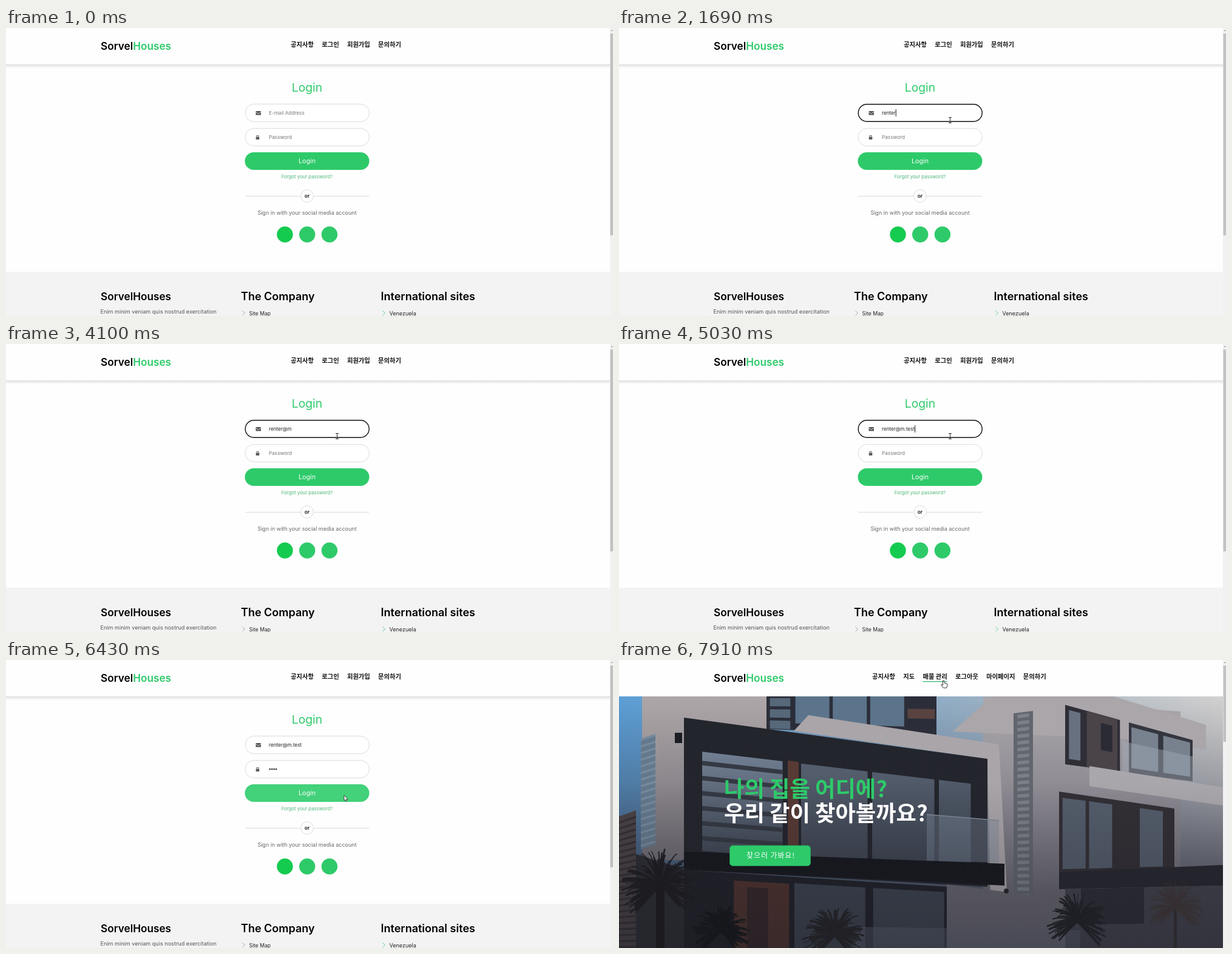
Animation of 1000 by 475 pixels, one loop 7990 ms. Source, as an HTML page with a canvas:

```html
<!DOCTYPE html>
<html lang="ko">
<head>
<meta charset="utf-8">
<title>Login</title>
<style>
html, body { margin: 0; width: 100%; height: 100%; overflow: hidden; background: #fefefe; }
canvas { display: block; width: 1000px; height: 475px; }
</style>
</head>
<body>
<canvas id="stage" width="1000" height="475"></canvas>
<script>
const W = 1000, H = 475, LOOP = 7990;
const FOCUS = 700, TAB = 5120, CLICK = 6360, SWAP = 6510;
const STEP = 75, BLINK = 530;
const GREEN = '#2eca6a';
const LATIN = 'Inter, "Open Sans", sans-serif';
const HANGUL = '"Noto Sans CJK KR", "Noto Sans CJK JP", "Noto Sans CJK", sans-serif';
const BRAND = ['Sorvel', 'Houses'];
const EMAIL = 'renter@m.test';

// times of the key strokes
const EMAIL_KEYS = [1010, 1070, 1380, 1540, 1540, 1690, 2700, 3570, 4250, 4410, 4650, 4820, 5030];
const PASS_KEYS = [5420, 5590, 5650, 5810];

// pointer moves: start, end, from, to
const MOVES = [
  [70, 770, [967, 476], [545, 152]],
  [5980, 6430, [545, 152], [557, 223]],
  [SWAP, SWAP, [557, 223], [555, 222]],
  [6970, 7510, [555, 222], [478, 33]],
  [7670, 7910, [478, 33], [534, 33]]
];

const NAV_GUEST = ['공지사항', '로그인', '회원가입', '문의하기'];
const NAV_USER = ['공지사항', '지도', '매물 관리', '로그아웃', '마이페이지', '문의하기'];

const stage = document.getElementById('stage').getContext('2d');
let c = stage;

function text(str, x, y, size, color, opt = {}) {
  c.font = `${opt.weight || 400} ${size}px ${opt.family || LATIN}`;
  c.textAlign = opt.align || 'left';
  c.letterSpacing = (opt.spacing || 0) + 'px';
  c.fillStyle = color;
  c.fillText(str, x, y);
  const w = c.measureText(str).width;
  c.letterSpacing = '0px';
  return w;
}

function rect(x, y, w, h, color) {
  c.fillStyle = color;
  c.fillRect(x, y, w, h);
}

function pill(x, y, w, h, r, fill, stroke, width = 1) {
  c.beginPath();
  c.roundRect(x, y, w, h, r);
  c.fillStyle = fill;
  c.fill();
  if (stroke) { c.strokeStyle = stroke; c.lineWidth = width; c.stroke(); }
}

function disc(x, y, r, fill, stroke) {
  c.beginPath();
  c.arc(x, y, r, 0, Math.PI * 2);
  c.fillStyle = fill;
  c.fill();
  if (stroke) { c.strokeStyle = stroke; c.lineWidth = 1; c.stroke(); }
}

function trace(pts) {
  c.beginPath();
  for (let i = 0; i < pts.length; i += 2) c.lineTo(pts[i], pts[i + 1]);
}

function poly(color, ...pts) {
  trace(pts);
  c.closePath();
  c.fillStyle = color;
  c.fill();
}

function line(color, width, ...pts) {
  trace(pts);
  c.strokeStyle = color;
  c.lineWidth = width;
  c.stroke();
}

function fade(x0, y0, x1, y1, ...stops) {
  const g = c.createLinearGradient(x0, y0, x1, y1);
  stops.forEach((s, i) => g.addColorStop(i / (stops.length - 1), s));
  return g;
}

const down = (y0, y1, ...stops) => fade(0, y0, 0, y1, ...stops);

// A wall with upright sides in perspective; panels are given in fractions of it.
function wall(x0, x1, topL, topR, botL, botR) {
  const at = (u, v) => {
    const top = topL + (topR - topL) * u, bot = botL + (botR - botL) * u;
    return [x0 + (x1 - x0) * u, top + (bot - top) * v];
  };
  return (color, u0 = 0, u1 = 1, v0 = 0, v1 = 1) =>
    poly(color, ...at(u0, v0), ...at(u1, v0), ...at(u1, v1), ...at(u0, v1));
}

function plant(x, y, r, color, seed) {
  const rnd = () => (seed = (seed * 16807) % 2147483647) / 2147483647;
  for (let i = 0; i < 130; i++) {
    const a = -Math.PI * (rnd() * 1.5 - 0.25), d = r * (0.5 + 0.5 * rnd());
    c.beginPath();
    c.moveTo(x, y);
    c.quadraticCurveTo(x + Math.cos(a) * d * 0.6, y + Math.sin(a) * d * 0.75 - 4,
      x + Math.cos(a) * d, y + Math.sin(a) * d + 4);
    c.strokeStyle = color;
    c.lineWidth = 1 + rnd() * 2;
    c.stroke();
  }
}

function drawSky() {
  rect(0, 60, W, 415, fade(0, 0, W, 0, '#5c9fd6', '#7ba6cb', '#a3b5c3', '#d4d2d1'));
  rect(0, 60, W, 415, down(60, 420, 'rgba(50,58,80,0)', 'rgba(60,62,78,.9)'));
}

function drawRightHouse() {
  const body = wall(600, 925, 60, 85, 420, 420);
  body(down(60, 400, '#aca9ad', '#8a8790', '#66646e'));
  poly('#aaa6aa', 550, 118, 614, 60, 815, 60, 967, 107, 967, 148, 830, 130);

  const upper = wall(735, 945, 74, 132, 172, 200);
  upper('#2f2e37', 0, 0.43);
  upper('#677180', 0.03, 0.12, 0.07, 0.9);
  upper('#4a4347', 0.17, 0.41);
  upper('#2a2b34', 0.28, 0.37, 0.15, 0.65);
  upper('#34363f', 0.5, 1);
  for (const u of [0.52, 0.77]) upper('#78828f', u, u + 0.21, 0.08, 0.9);
  upper('rgba(160,168,180,.45)', 0.45, 1, 0.4, 1);
  wall(775, 995, 175, 210, 208, 240)('#aaa7ac');

  const lower = wall(725, 915, 217, 245, 352, 345);
  lower('#322f35');
  for (const u of [0.03, 0.26, 0.7]) lower('#545d6b', u, u + 0.2, 0.07, 0.95);
  wall(725, 995, 350, 338, 378, 372)('#27272f');

  const base = wall(735, 995, 378, 372, 475, 475);
  base('#42434d');
  base('#2c2d36', 0.1, 0.5, 0, 0.6);

  const blocks = wall(650, 682, 88, 84, 400, 400);
  blocks('#62666f');
  for (let v = 0.01; v < 1; v += 0.035) blocks('#7c8088', 0.2, 0.8, v, v + 0.018);
}

function drawLeftHouse() {
  wall(38, 243, 60, 60, 330, 330)(down(60, 330, '#aea7a9', '#6d6a72'));
  const blocks = wall(36, 60, 130, 122, 312, 305);
  blocks('#64798d');
  for (let v = 0; v < 1; v += 0.06) blocks('#768a9c', 0, 1, v, v + 0.02);

  const upper = wall(243, 523, 60, 60, 114, 124);
  upper('#2b2e39');
  for (let v = 0.05; v < 0.9; v += 0.34) upper('#56687a', 0.02, 0.14, v, v + 0.25);
  for (let u = 0.17; u < 0.8; u += 0.22) upper('#5c748b', u, u + 0.2, 0, 0.8);
  upper('#594340', 0.83, 0.99, 0.33, 0.58);
  poly('#aaa5a9', 288, 117, 312, 91, 626, 139, 640, 400, 612, 400, 607, 163);

  const front = wall(107, 607, 95, 163, 346, 374);
  front(down(95, 350, '#23252c', '#24252d'));
  front(down(150, 320, '#728094', '#3f4653'), 0.06, 0.325, 0.21, 0.87);
  for (let v = 0.27; v < 0.85; v += 0.1) front('#343943', 0.06, 0.325, v, v + 0.03);
  front('#573a34', 0.342, 0.378, 0.2, 0.87);
  for (const [u0, u1] of [[0.386, 0.605], [0.62, 0.825], [0.84, 0.945]])
    front(down(185, 335, '#535d6c', '#3d4350'), u0, u1, 0.21, 0.86);

  const rail = wall(507, 626, 254, 264, 331, 334);
  rail('rgba(125,139,155,.45)');
  rail('#808b98', 0, 1, 0, 0.02);

  const ground = wall(107, 540, 346, 374, 475, 475);
  ground('#202128');
  ground('#4f332e', 0.19, 0.4, 0.1);
  ground('#35272a', 0.24, 0.32, 0.18);
  for (const u of [0.42, 0.72]) ground('#3d4450', u, u + 0.27, 0.09);
  wall(540, 735, 370, 395, 475, 475)('#696871');
  wall(107, 635, 316, 336, 346, 372)('#17181e');
  wall(390, 760, 440, 446, 475, 475)('rgba(95,103,117,.45)');
  disc(638, 381, 4, '#25262e');
  rect(92, 120, 12, 17, '#1b1d25');
}

function drawGarden() {
  const annex = wall(0, 28, 258, 248, 475, 475);
  annex('#4a4245');
  for (let v = 0.04; v < 1; v += 0.045) annex('#343037', 0, 1, v, v + 0.015);
  wall(28, 107, 320, 345, 475, 475)('#2d2d34');
  rect(0, 60, W, 415, down(200, H, 'rgba(25,26,34,0)', 'rgba(25,26,34,.38)'));
  rect(61, 372, 14, 103, '#1c1a1e');
  plant(68, 372, 65, '#1d1c21', 11);
  plant(168, 448, 48, '#17181d', 23);
  plant(355, 455, 54, '#212126', 37);
  plant(755, 432, 52, '#1f2026', 53);
  rect(914, 412, 5, 63, '#2b282d');
  plant(917, 408, 50, '#37303380', 71);
}

const photo = document.createElement('canvas');
photo.width = W;
photo.height = H;
c = photo.getContext('2d');
drawSky();
drawRightHouse();
drawLeftHouse();
drawGarden();
c = stage;

// returns the place of each label
function drawHeader(nav, left) {
  rect(0, 0, 995, 60, '#fefefe');
  const w = text(BRAND[0], 156, 36, 17.2, '#000', { weight: 600 });
  text(BRAND[1], 156 + w, 36, 17.2, GREEN, { weight: 600 });
  let x = left;
  return nav.map(label => {
    const place = { x, w: text(label, x, 30.5, 10.3, '#111', { weight: 700, family: HANGUL }) };
    x += place.w + 13.3;
    return place;
  });
}

function drawScrollbar(bottom) {
  rect(995, 0, 5, H, '#f1f1f1');
  rect(995.5, 9, 4.5, bottom - 9, '#c1c1c1');
  poly('#8a8a8a', 996.5, 5, 998, 3, 999.5, 5);
}

function drawField(y, focused) {
  if (focused) pill(394.2, y + 0.7, 204, 28.6, 14.3, '#fff', '#111', 1.4);
  else pill(394, y + 0.5, 204.5, 29, 14.5, '#fff', '#dcdcdc');
}

const typed = (keys, t) => keys.filter(k => k <= t).length;

// the caret stays lit after each stroke, then blinks
function drawCaret(x, y, t, keys, focusTime) {
  const last = Math.max(focusTime, ...keys.filter(k => k <= t));
  if ((t - last) % (2 * BLINK) < BLINK) rect(x, y - 6, 1, 12, '#222');
}

function drawEmail(t) {
  const focused = t >= FOCUS && t < TAB, n = typed(EMAIL_KEYS, t);
  drawField(125, focused);
  rect(411.5, 137, 8.5, 6.5, '#555');
  line('#fff', 0.8, 411.5, 138.5, 415.7, 141.3, 420, 138.5);
  let w = 0;
  if (n) w = text(EMAIL.slice(0, n), 433, 143, 8.1, '#222');
  else text('E-mail Address', 433, 143, 8.2, '#777');
  if (focused) drawCaret(433 + w, 140, t, EMAIL_KEYS, FOCUS);
}

function drawPassword(t) {
  const focused = t >= TAB && t < CLICK, n = typed(PASS_KEYS, t);
  drawField(165, focused);
  rect(411.7, 179.5, 5.6, 4.3, '#555');
  c.beginPath();
  c.arc(414.5, 179, 1.8, Math.PI, 0);
  c.strokeStyle = '#555';
  c.lineWidth = 1.1;
  c.stroke();
  if (!n) text('Password', 433, 183, 8.2, '#777');
  for (let i = 0; i < n; i++) disc(434.8 + i * 3.4, 180, 1.3, '#222');
  if (focused) drawCaret(433 + n * 3.4, 180, t, PASS_KEYS, TAB);
}

function drawForm(t, pos) {
  const mid = { align: 'center' };
  text('Login', 496, 104.5, 19.3, GREEN, mid);
  drawEmail(t);
  drawPassword(t);

  const hover = pos && pos[0] > 394 && pos[0] < 598 && pos[1] > 205 && pos[1] < 234;
  pill(393.5, 205, 205, 29, 14.5, hover ? '#43d17a' : GREEN);
  text('Login', 496, 223, 10.7, '#fff', mid);
  text('Forgot your password?', 496, 248, 7.8, '#4fb878', mid);

  rect(394, 277, 204.5, 1, '#dcdcdc');
  disc(496, 277, 10.3, '#fff', '#dcdcdc');
  text('or', 496, 280, 8.3, '#333', { weight: 700, align: 'center' });
  text('Sign in with your social media account', 496, 307.5, 9, '#666', mid);
  ['#15cb4f', GREEN, GREEN].forEach((color, i) => disc(459.5 + i * 36.7, 340.5, 13.2, color));
}

function drawFooter() {
  const head = { weight: 600 };
  rect(0, 402, 995, 73, '#f3f3f3');
  text(BRAND.join(''), 156, 448.5, 17.2, '#000', head);
  text('The Company', 387, 448.5, 18, '#000', head);
  text('International sites', 617.5, 448.5, 18, '#000', head);
  text('Enim minim veniam quis nostrud exercitation', 155.5, 470.5, 9.1, '#555');
  text('Site Map', 400.5, 474, 8.6, '#222');
  text('Venezuela', 631.5, 474, 9, '#222');
  line('#a5aaa7', 1, 389.5, 466.5, 393.5, 470.3, 389.5, 474);
  line('#62cf8d', 1, 620.5, 466.5, 624.5, 470.3, 620.5, 474);
}

function drawLogin(t, pos) {
  rect(0, 0, W, H, '#fefefe');
  rect(0, 60, 995, 6, down(60, 66, '#dedede', '#fefefe'));
  drawHeader(NAV_GUEST, 469);
  drawForm(t, pos);
  drawFooter();
  drawScrollbar(342);
}

// grows from the left on enter, shrinks to the right on leave
function underline(t, { x, w }, enter, leave) {
  const ease = from => 1 - (1 - Math.min(1, Math.max(0, (t - from) / 150))) ** 2;
  const a = w * ease(leave), b = w * ease(enter);
  if (b > a) rect(x + a, 35, b - a, 1.2, '#35b56b');
}

function drawHome(t) {
  rect(0, 0, W, H, '#fefefe');
  c.drawImage(photo, 0, 0);
  const links = drawHeader(NAV_USER, 417);
  underline(t, links[1], 7430, 7750);
  underline(t, links[2], 7750, LOOP);
  const big = { weight: 700, family: HANGUL };
  text('나의 집을 어디에?', 173, 225.5, 36.3, GREEN, big);
  text('우리 같이 찾아볼까요?', 173, 265.5, 36.3, '#fff', big);
  pill(182.5, 306, 133, 33.5, 5, GREEN, '#27a357', 0.8);
  text('찾으러 가봐요!', 210, 326.5, 12, '#fff', { weight: 500, family: HANGUL, spacing: 0.9 });
  drawScrollbar(135);
}

function pointerAt(t) {
  const move = MOVES.filter(m => m[0] <= t).pop();
  if (!move) return null;
  const [start, end, from, to] = move;
  const steps = Math.round((end - start) / STEP) + 1;
  const gap = (end - start) / (steps - 1) || 1;
  const p = Math.min(steps, Math.floor((t - start) / gap + 0.001) + 1) / steps;
  const e = p * p * (3 - 2 * p);
  return from.map((v, i) => Math.round(v + (to[i] - v) * e));
}

function drawPointer(t, [x, y]) {
  const inField = x > 394 && x < 598 && ((y > 125 && y < 155) || (y > 165 && y < 195));
  c.save();
  c.translate(x, y);
  if (t < SWAP && inField) {
    line('#333', 1, 0.5, -4, 0.5, 4);
    for (const end of [-4.5, 4.5]) line('#333', 1, -2, end, 3, end);
  } else if (t >= SWAP && y < 42) {
    const hand = [-0.5, 1, 1.5, 1, 2, 5, 6.5, 6, 7, 9, 5.5, 13, 0.5, 13, -3.5, 8, -2.5, 7, -0.5, 8.5];
    poly('#fff', ...hand);
    line('#222', 0.9, ...hand, -0.5, 1);
  } else {
    const arrow = [0, 0, 0, 9, 2, 7.3, 3.4, 10.5, 4.8, 9.9, 3.5, 6.8, 6.2, 6.6];
    poly('#fff', ...arrow);
    line('#222', 0.8, ...arrow, 0, 0);
  }
  c.restore();
}

const begin = performance.now();
function tick() {
  const t = (performance.now() - begin) % LOOP;
  const pos = pointerAt(t);
  if (t < SWAP) drawLogin(t, pos);
  else drawHome(t);
  if (pos) drawPointer(t, pos);
  requestAnimationFrame(tick);
}
tick();
</script>
</body>
</html>
```
